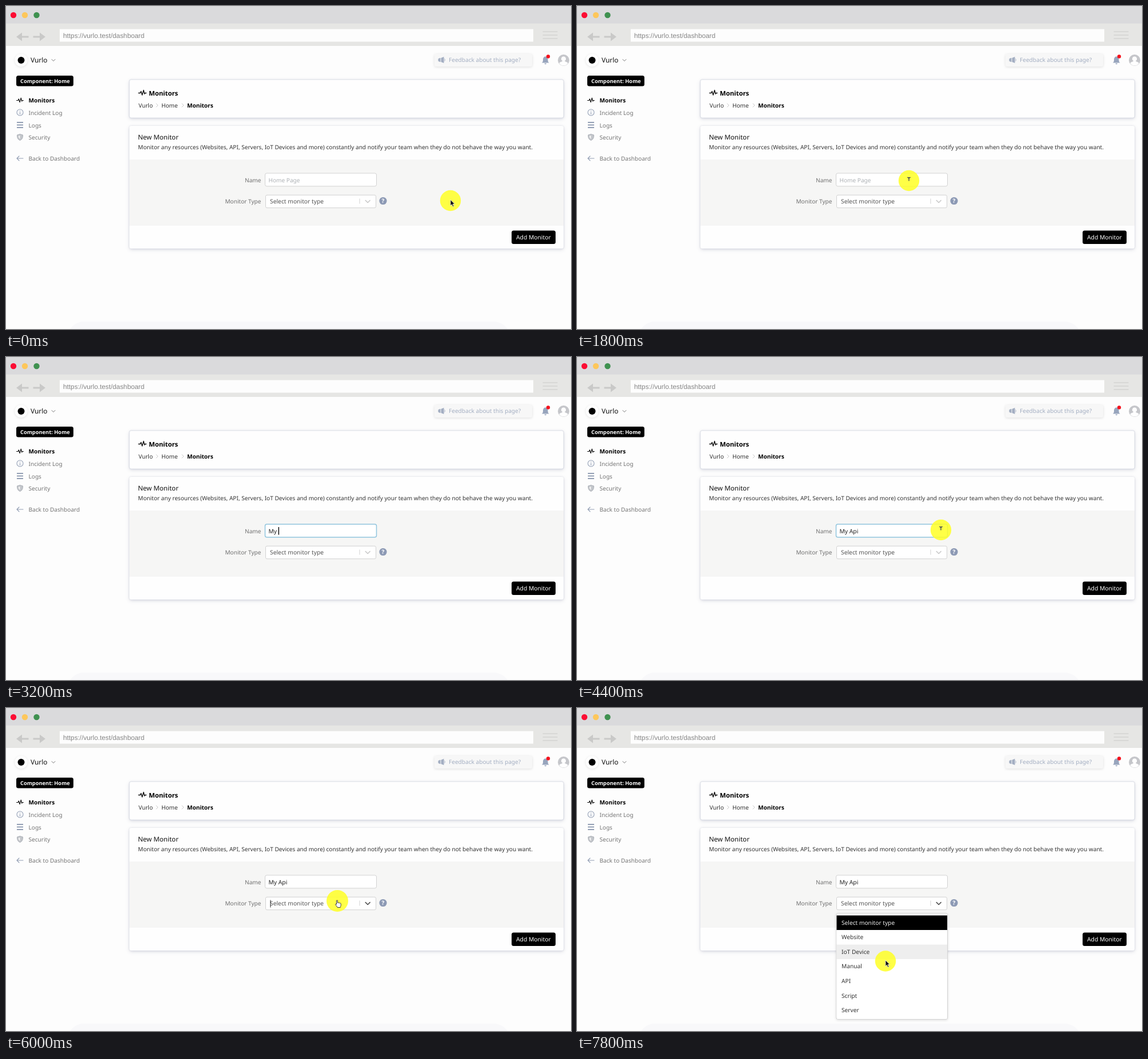
Animation of 989x566 px, one loop 8000 ms. Source, as an HTML page:

```html
<!DOCTYPE html>
<html lang="en">
<head>
<meta charset="utf-8">
<title>New monitor</title>
<style>
html, body { margin: 0; width: 100%; height: 100%; overflow: hidden; background: #fdfdfd; }
svg { display: block; width: 989px; height: 566px; font: 10.1px "Noto Sans", "Open Sans", sans-serif; text-rendering: geometricPrecision; }
text { white-space: pre; }
.line { fill: none; stroke-linecap: round; stroke-linejoin: round; }
.bold { font-weight: 600; fill: #000; }
.medium { font-weight: 500; fill: #111; }
.card { fill: #fefefe; filter: drop-shadow(0 2px 3px #3c42702e) drop-shadow(0 0 1px #3c427026); }
.nav { fill: #747474; }
.field { fill: #fff; stroke: #d2d2d2; }
</style>
</head>
<body>
<svg viewBox="0 0 989 566">
  <defs><path id="pulse" class="line" d="M0 0h3l1.4-3 2 6.5 2.4-8.5 1.7 6.5 1-1.5h2" stroke="#111" stroke-width="1.4"/></defs>

  <!-- browser frame -->
  <rect width="989" height="566" fill="#fdfdfd"/>
  <rect x="108" y="553" width="774" height="60" rx="28" fill="#f8f8fa"/>
  <rect width="989" height="31" fill="#dadadc"/>
  <rect y="30.5" width="989" height="39.5" fill="#e6e6e4"/>
  <circle cx="13" cy="16" r="5.2" fill="#fc0d34"/>
  <circle cx="33" cy="16" r="5.2" fill="#fdc75b"/>
  <circle cx="53.500" cy="16" r="5.2" fill="#3f9150"/>
  <g fill="#c9c9c8">
    <path d="M18 54l10-7.500v6h11.500v3H28v6z"/>
    <path d="M69 54l-10-7.500v6H47.500v3H59v6z"/>
  </g>
  <path class="line" d="M940 45h25M940 51h25M940 57h25" stroke="#d3d3d1" stroke-width="1.300"/>
  <rect x="94" y="40.500" width="829" height="22" fill="#fdfdfd"/>
  <text x="100" y="56" font-size="11.800" fill="#858585" style="font-family:'Liberation Sans',Arial,sans-serif">https://vurlo.test/dashboard</text>

  <!-- top bar -->
  <circle cx="26.500" cy="95" r="11" fill="#fff" style="filter:drop-shadow(0 1px 2px #0000001a)"/>
  <circle cx="26.500" cy="95" r="6" fill="#000"/>
  <text class="medium" x="43" y="98.700" font-size="11.900">Vurlo</text>
  <path class="line" d="M80 93.500l3 3 3-3" stroke="#777"/>
  <rect x="750" y="84" width="171" height="22" rx="3" fill="#f7f7f7" style="filter:drop-shadow(0 1px 2px #0000001f)"/>
  <g fill="#a3aec2">
    <path d="M756.500 92.500l3-1.500h1v7h-1l-3-1.500zM761.500 91l5-2v11l-5-2z"/>
    <path class="line" d="M767.500 92.500a2.500 2.500 0 0 1 0 4" stroke="#a3aec2"/>
    <text x="775" y="98">Feedback about this page?</text>
  </g>
  <path d="M938 99.500c2-1.500 2-3.500 2-6 0-3 2-5 4.300-5s4.200 2 4.200 5c0 2.500 0 4.500 2 6zM942.500 100.500h3.500a1.750 1.750 0 0 1-3.500 0z" fill="#98a5bd"/>
  <circle cx="949" cy="88.500" r="3.200" fill="#f5121d"/>
  <circle cx="976" cy="95" r="10" fill="#c5c6ca"/>
  <path d="M976 88.500a4 4 0 0 1 2 7.500c.300 2 5 1.500 5.500 4.500a9 9 0 0 1-15 0c.500-3 5.200-2.500 5.500-4.500a4 4 0 0 1 2-7.500z" fill="#fff"/>

  <!-- sidebar -->
  <rect x="18" y="122" width="100" height="18.500" rx="3.500" fill="#000"/>
  <text x="25" y="135" class="bold" font-size="9.300" style="fill:#fff">Component: Home</text>
  <use href="#pulse" transform="translate(18.500 165.500) scale(.88)"/>
  <text class="bold" x="39.500" y="169">Monitors</text>
  <g class="line" stroke="#929eb4" stroke-width="1.100">
    <circle cx="24.500" cy="186.500" r="5.500"/>
    <path d="M24.500 186v3.500M24.500 183.600v.3"/>
    <path d="M19 204h11M19 208.500h11M19 213h11" stroke-width="2" stroke-linecap="butt"/>
    <path d="M19 267h11M23 263l-4 4 4 4"/>
  </g>
  <path d="M24.500 224.500l5 1.500c0 5-1 7.500-5 9.500-4-2-5-4.500-5-9.500z" fill="#c2c5ca" stroke="#adb1b8"/>
  <path d="M24.500 227v6c-2-1.300-2.700-2.700-2.800-5.200z" fill="#f2f2f2"/>
  <g class="nav">
    <text x="39.500" y="190.800">Incident Log</text>
    <text x="39.500" y="212.600">Logs</text>
    <text x="39.500" y="234.200">Security</text>
    <text x="39.500" y="271">Back to Dashboard</text>
  </g>

  <!-- cards -->
  <rect class="card" x="216" y="129" width="760" height="67" rx="3"/>
  <rect x="216" y="129" width="760" height="67" rx="3" fill="none" stroke="#d9dce4" stroke-width=".8"/>
  <use href="#pulse" x="232" y="152.500"/>
  <text class="bold" x="250" y="156.700" font-size="11.300">Monitors</text>
  <g fill="#333">
    <text x="232" y="177.800">Vurlo</text>
    <text x="272" y="177.800">Home</text>
  </g>
  <path class="line" d="M263 171l3 3-3 3M308 171l3 3-3 3" stroke="#bbb" stroke-width=".8"/>
  <text class="bold" x="317" y="177.800">Monitors</text>

  <rect class="card" x="216" y="210" width="760" height="215" rx="3"/>
  <rect x="216" y="269" width="760" height="116" fill="#f6f6f5"/>
  <text class="medium" x="231" y="234" font-size="11.600">New Monitor</text>
  <text x="231" y="251" font-size="10.080" fill="#333">Monitor any resources (Websites, API, Servers, IoT Devices and more) constantly and notify your team when they do not behave the way you want.</text>
  <g fill="#707070" text-anchor="end">
    <text x="446.500" y="308.500">Name</text>
    <text x="446.500" y="345.700">Monitor Type</text>
  </g>
  <rect id="nameBox" class="field" x="453.500" y="293" width="195" height="22.800" rx="3"/>
  <text id="name" x="459.500" y="308.500"></text>
  <rect id="nameCaret" y="298" width="1.500" height="13.500" fill="#111"/>
  <rect class="field" x="454.500" y="331.300" width="193" height="22.400" rx="2.500"/>
  <text x="462" y="346" font-size="10.300" fill="#555">Select monitor type</text>
  <rect id="typeCaret" x="462.500" y="336.500" width="1" height="13" fill="#222"/>
  <path d="M619 337.500v9" stroke="#d0d0d0"/>
  <path id="chevron" class="line" d="M629.300 340.700l3.900 3.800 3.900-3.800" stroke-width="1.700"/>
  <circle cx="660" cy="341.500" r="6.600" fill="#8d9ab5"/>
  <text x="660" y="345.200" class="bold" text-anchor="middle" style="fill:#fff">?</text>
  <rect x="885" y="393.500" width="77" height="23.500" rx="3.500" fill="#000"/>
  <text x="893" y="409" font-size="10.300" fill="#fff">Add Monitor</text>

  <g id="menu" font-size="10.200">
    <rect x="454" y="360" width="194.500" height="185.500" rx="2.500" fill="#fff" stroke="#d4d4d4" style="filter:drop-shadow(0 1px 2px #0002)"/>
  </g>

  <g id="pointer">
    <circle id="halo" fill="#ffff28" fill-opacity=".86"/>
    <path id="arrow" d="M0-1.500v10.500l2.400-2.200 1.800 4 1.800-.8-1.800-3.900h3.300z" fill="#111" stroke="#fff" stroke-width=".7"/>
    <path id="beam" class="line" d="M-2.200-5.500q2 0 2.200 1.500 .2-1.500 2.200-1.500M0-4v4" stroke="#333a55" stroke-width="1.300"/>
    <path id="hand" d="M-1.500 0c0-1.500 2-1.500 2 0v3.500c.6-.8 1.700-.6 2 .2 .6-.6 1.600-.4 1.900.4 .8-.4 1.800.1 1.800 1v2.600c0 2-1 2.300-1 3.800H.2c-.5-1.700-2.900-3.400-3.400-5-.3-1.200 1-1.500 1.700-.4z" fill="#fff" stroke="#222" stroke-width=".9"/>
  </g>
</svg>
<script>
const $ = id => document.getElementById(id);
const LOOP = 8000, STEP = 200, ROW = 25.55, MENU_TOP = 363.5;
const options = ['Select monitor type', 'Website', 'IoT Device', 'Manual', 'API', 'Script', 'Server'];
// start, end, destination x, destination y
const moves = [[600, 1800, 581, 306], [4000, 4400, 637, 303], [4600, 5400, 580, 338], [7200, 7800, 540, 443.5]];

function add(parent, tag, attrs, label = '') {
  const el = document.createElementNS('http://www.w3.org/2000/svg', tag);
  for (const key in attrs) el.setAttribute(key, attrs[key]);
  el.textContent = label;
  parent.append(el);
  return el;
}

const rows = options.map((label, i) => {
  const y = MENU_TOP + i * ROW;
  const row = add($('menu'), 'rect', { x: 454.5, y, width: 193.5, height: ROW });
  add($('menu'), 'text', { x: 463, y: y + 16.3, fill: i ? '#333' : '#eee' }, label);
  return row;
});

const show = (id, on) => $(id).style.display = on ? '' : 'none';
const within = (t, ...spans) => spans.some(([a, b]) => t >= a && t < b);
const ease = p => p * p * (3 - 2 * p);

function pointerAt(t) {
  let x = 778, y = 341;
  for (const [start, end, toX, toY] of moves) {
    const p = ease(Math.min(1, Math.max(0, (t - start) / (end - start))));
    x += (toX - x) * p;
    y += (toY - y) * p;
  }
  return [x, y];
}

function typedAt(t) {
  const count = t < 3600 ? Math.min(3, (t - 2600) / STEP) : (t - 2800) / STEP;
  return 'My Api'.slice(0, Math.max(0, count));
}

function draw(t) {
  const [x, y] = pointerAt(t);
  const typed = typedAt(t), open = t >= 6200;
  const focused = within(t, [2000, 6000]);

  $('name').textContent = typed || 'Home Page';
  $('name').setAttribute('fill', typed ? '#222' : '#adb1b5');
  $('name').setAttribute('font-size', typed ? 10.3 : 10.1);
  $('nameBox').style.stroke = focused ? '#91c5de' : '';
  $('nameBox').style.strokeWidth = focused ? 1.5 : 1;
  const textWidth = typed ? $('name').getComputedTextLength() : 0;
  $('nameCaret').setAttribute('x', 459.3 + textWidth);
  show('nameCaret', within(t, [2000, 2400], [2800, 4200], [4800, 5200]));
  show('typeCaret', within(t, [6000, 6400], [7000, 7400]));
  $('chevron').setAttribute('stroke', t >= 6000 ? '#555' : '#ccc');

  show('menu', open);
  const hover = Math.floor((y - 5 - MENU_TOP) / ROW);
  rows.forEach((row, i) => row.setAttribute('fill', !i ? '#000' : i === hover ? '#eee' : '#fff'));

  const inX = x > 454 && x < 648;
  const shape = inX && y > 293 && y < 316 ? 'beam' : inX && y > 331 && y < 354 ? 'hand' : 'arrow';
  for (const id of ['beam', 'hand', 'arrow']) show(id, id === shape);
  show('pointer', !within(t, [2800, 4200]));
  $('pointer').setAttribute('transform', `translate(${x} ${y})`);
  $('halo').setAttribute('r', within(t, [2000, 2200], [6000, 6200]) ? 19 : 18.2);
}

function frame(now) {
  draw(Math.floor(now % LOOP / STEP) * STEP);
  requestAnimationFrame(frame);
}
frame(performance.now());
</script>
</body>
</html>
```
